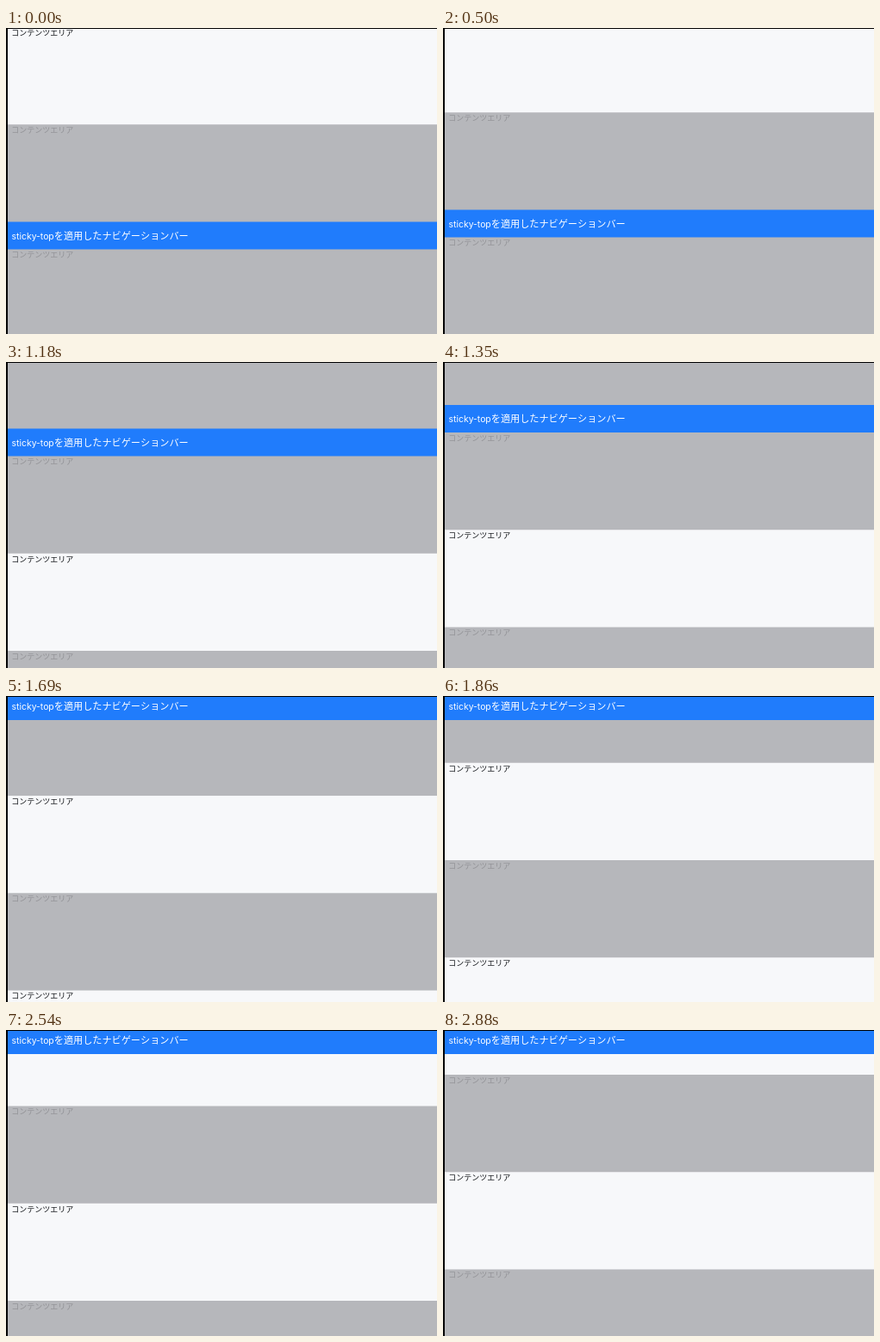
Animation, 500 px wide and 356 px high, one loop 8 s. Source, as an HTML page with a canvas:

```html
<!DOCTYPE html>
<html lang="ja">
<head>
<meta charset="utf-8">
<title>Sticky navigation bar</title>
<style>
  html, body { margin: 0; height: 100%; overflow: hidden; background: #000; }
  canvas { display: block; }
</style>
</head>
<body>
<canvas id="stage" width="500" height="356"></canvas>
<script>
const ctx = document.getElementById('stage').getContext('2d');
const W = 500, H = 356, LOOP = 8000;
const EDGE = 2, TEXT_X = 6.2;
const SECTION_H = 113.25, NAV_TOP = 225.5, NAV_H = 32, STUCK_TOP = -4;
const CJK = '"Noto Sans CJK JP", "Noto Sans CJK", sans-serif';

// [time in ms, scroll offset in px]
const scrollSteps = [
  [0, 0], [500, 14], [670, 62], [840, 74], [1180, 148], [1350, 175.5], [1690, 254.7],
  [1860, 293], [2200, 339], [2370, 391.5], [2540, 395.5], [2710, 398.5], [2880, 432]
];
const light = { fill: '#f7f8fa', text: '#15181c' };
const muted = { fill: '#b6b7bb', text: '#929397' };
const sections = [light, muted, muted, light, muted, light, muted];

function label(text, x, y, font, color) {
  ctx.font = font;
  ctx.fillStyle = color;
  ctx.fillText(text, x, y);
  return x + ctx.measureText(text).width;
}

function drawSection({ fill, text }, top) {
  if (top > H) return;
  // Fill to the bottom; the next section covers the rest.
  ctx.fillStyle = fill;
  ctx.fillRect(EDGE, top, W, H);
  label('コンテンツエリア', TEXT_X, top + 9.9, '9px ' + CJK, text);
}

function drawNav(top) {
  ctx.fillStyle = '#207cfc';
  ctx.fillRect(EDGE, top, W, NAV_H);
  const x = label('sticky-top', TEXT_X + 0.4, top + 20, '10.4px Inter, sans-serif', '#fff');
  label('を適用したナビゲーションバー', x, top + 20.2, '11.15px ' + CJK, '#fff');
}

function draw(now) {
  const t = now % LOOP;
  const scroll = scrollSteps.filter(([start]) => start <= t).pop()[1];
  sections.forEach((section, i) => {
    const top = -1 + i * SECTION_H + (i > 1 ? NAV_H : 0);
    drawSection(section, top - scroll);
  });
  drawNav(Math.max(NAV_TOP - scroll, STUCK_TOP));

  ctx.fillStyle = '#000';
  ctx.fillRect(0, 0, W, 1);
  ctx.fillRect(0, 0, EDGE, H);
  requestAnimationFrame(draw);
}
requestAnimationFrame(draw);
</script>
</body>
</html>
```
